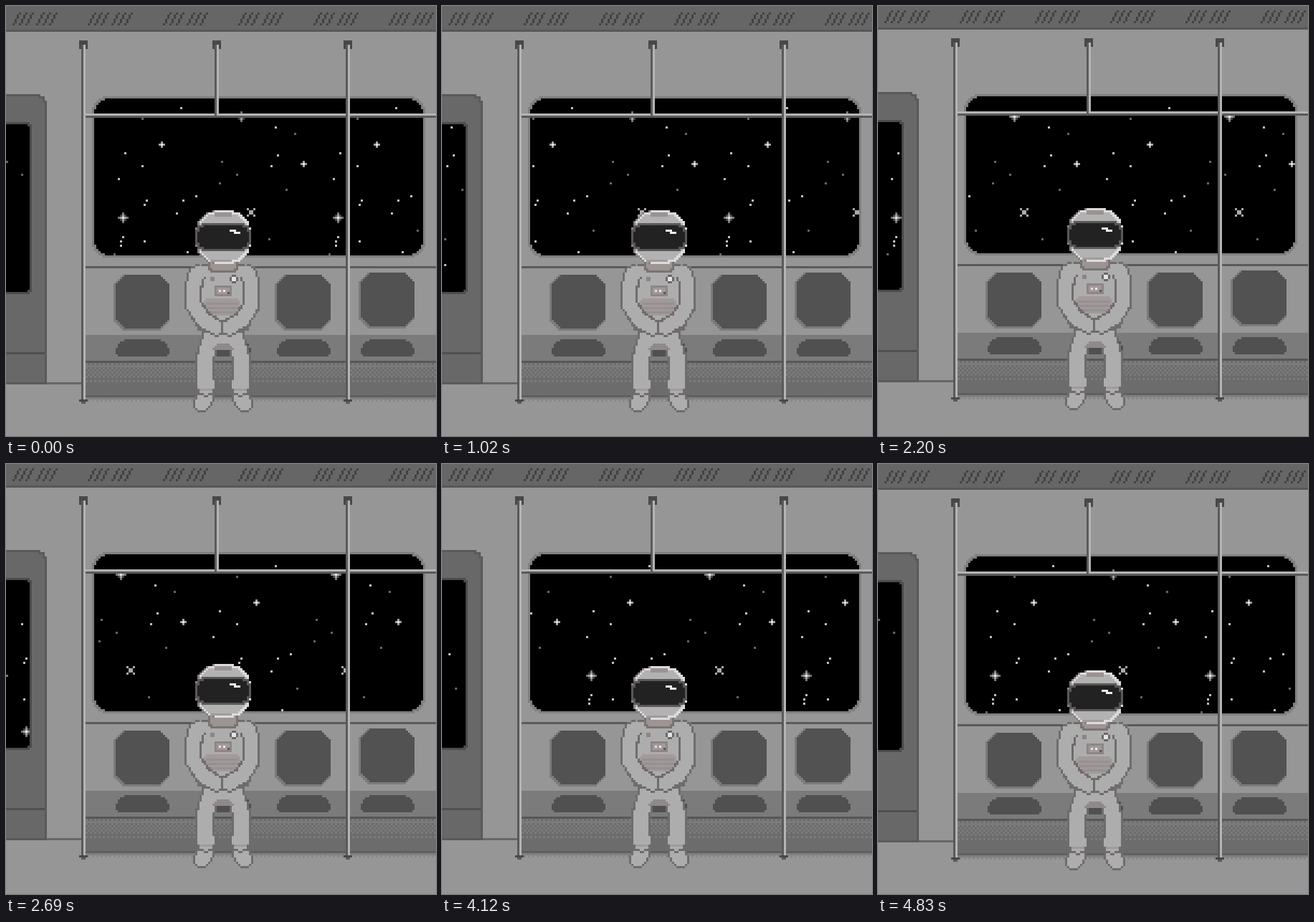
An HTML page with a canvas that plays this animation: 600x600 px, repeating every 4.86 s.

```html
<!DOCTYPE html>
<html lang="en">
<head>
<meta charset="utf-8">
<title>Space train</title>
<style>
html, body { margin: 0; width: 100%; height: 100%; overflow: hidden; background: #969696; }
canvas { display: block; width: 100%; height: 100%; image-rendering: pixelated; }
</style>
</head>
<body>
<canvas id="stage" width="200" height="200"></canvas>
<script>
const LOOP = 4860, FRAMES = 140, FIELD = 100, HEAD_LAG = 70, DIP = 80;
const SUIT = '#adadad', LINE = '#706c6c', SHADE = '#a29a9a';
const LIGHT = '#b4b4b4', DARK = '#5a5a5a', CAP = '#484848';
const stage = document.getElementById('stage').getContext('2d');

// Everything is drawn on a 200 x 200 grid of whole cells.
function layer(paint) {
  const canvas = document.createElement('canvas');
  canvas.width = 200;
  canvas.height = 206;
  paint(canvas.getContext('2d'));
  return canvas;
}

function box(g, color, x, y, w, h) {
  g.fillStyle = color;
  g.fillRect(x, y, w, h);
}

function rounded(g, color, x, y, w, h, top, bottom = top) {
  const inset = (r, row) => row < r ? Math.round(r - Math.sqrt(r * r - (r - row - 0.5) ** 2)) : 0;
  for (let row = 0; row < h; row++) {
    const cut = Math.max(inset(top, row), inset(bottom, h - 1 - row));
    box(g, color, x + cut, y + row, w - 2 * cut, 1);
  }
}

function distance(x, y, [ax, ay], [bx, by]) {
  const dx = bx - ax, dy = by - ay;
  const along = ((x - ax) * dx + (y - ay) * dy) / (dx * dx + dy * dy);
  const k = Math.min(1, Math.max(0, along));
  return Math.hypot(x - ax - k * dx, y - ay - k * dy);
}

// A thick line through the joints with round ends.
function limb(g, color, joints, radius) {
  for (let y = 115; y < 195; y++)
    for (let x = 78; x < 124; x++)
      for (let i = 1; i < joints.length; i++)
        if (distance(x + 0.5, y + 0.5, joints[i - 1], joints[i]) < radius) box(g, color, x, y, 1, 1);
}

// Joints are given as distance from the middle line.
const place = (side, middle, joints) => joints.map(([d, y]) => [middle + side * d, y]);

function pole(g, x, end) {
  box(g, CAP, x - 1, 16, 4, 4);
  box(g, DARK, x, 18, 1, end - 18);
  box(g, LIGHT, x + 1, 18, 1, end - 18);
  if (end < 100) return;
  box(g, CAP, x - 1, end, 4, 1);
  box(g, DARK, x, end + 1, 2, 1);
}

function seat(g, x, y) {
  rounded(g, '#7b7b7b', x - 1, y, 26, 26, 7);
  rounded(g, '#525252', x, y, 25, 25, 7);
  rounded(g, '#505050', x, 155, 25, 8, 6, 2);
}

const train = layer(g => {
  box(g, '#969696', 0, 0, 200, 206);
  box(g, '#666', 0, 0, 200, 11);
  box(g, '#575757', 0, 11, 200, 1);
  for (let x = 3; x < 200; x += 35)
    for (let n = 0; n < 6; n++)
      for (let r = 0; r < 6; r++)
        box(g, '#424242', x + n * 3 + (n > 2 ? 2 : 0) + 3 - Math.ceil(r / 2), 3 + r, 1, 1);

  // Door
  box(g, '#666', 0, 175, 36, 1);
  rounded(g, DARK, -10, 41, 29, 135, 5, 0);
  rounded(g, '#686868', -10, 42, 28, 133, 5, 0);
  box(g, '#505050', 0, 161, 18, 1);
  rounded(g, '#4c4c4c', -10, 54, 22, 80, 3);

  // Bench, its front darkening downwards through a dot pattern
  box(g, DARK, 36, 121, 164, 1);
  box(g, '#7b7b7b', 36, 153, 164, 28);
  box(g, '#575757', 36, 165, 164, 1);
  for (let y = 166; y < 181; y++)
    for (let x = 36; x < 200; x++) {
      const rank = (x + y) % 2 * 2 + x % 2;
      if (rank < (y - 165) / 3) box(g, '#6c6c6c', x, y, 1, 1);
    }
  box(g, '#5f5f5f', 36, 181, 164, 1);
  box(g, '#808080', 36, 182, 164, 1);
  for (let x = 36; x < 200; x += 2) box(g, '#888', x, 183, 1, 1);
  for (const x of [51, 89, 126]) seat(g, x, 125);
  seat(g, 165, 124);

  // Panes are cut out so that the sky shows through.
  rounded(g, '#7f7f7f', 40, 42, 155, 75, 8);
  g.globalCompositeOperation = 'destination-out';
  rounded(g, '#000', 41, 43, 153, 73, 8);
  rounded(g, '#000', -10, 55, 21, 78, 3);
  g.globalCompositeOperation = 'source-over';

  box(g, LIGHT, 36, 50, 164, 1);
  box(g, DARK, 36, 51, 164, 1);
  pole(g, 35, 183);
  pole(g, 97, 51);
  pole(g, 158, 183);
});

const body = layer(g => {
  const leg = [[6, 156], [8.5, 164], [8, 177]];
  const foot = [[8, 182], [10, 185]];
  const arm = [[12, 124.5], [13.5, 130], [13.5, 139], [9, 146], [3, 149.5]];
  const sides = [-1, 1];

  for (const side of sides) limb(g, LINE, place(side, 101, foot), 4.2);
  for (const side of sides) limb(g, SUIT, place(side, 101, foot), 3.2);
  for (const side of sides) limb(g, LINE, place(side, 101, leg), 4.6);
  rounded(g, LINE, 91, 150, 20, 10, 0, 3);
  for (const side of sides) limb(g, SUIT, place(side, 101, leg), 3.6);
  rounded(g, SUIT, 92, 150, 18, 9, 0, 3);
  rounded(g, '#8f8989', 96, 157, 10, 3, 4, 0);
  for (const side of sides) box(g, SHADE, 101 + side * 8 - 3, 178, 6, 1);

  // Torso
  rounded(g, LINE, 88, 120, 26, 32, 5);
  rounded(g, SUIT, 89, 121, 24, 30, 5);
  rounded(g, SHADE, 92, 136, 17, 8, 2, 4);
  for (let y = 138; y < 144; y += 2) box(g, '#979090', 93, y, 15, 1);

  for (const side of sides) {
    const joints = place(side, 100.8, arm);
    limb(g, LINE, joints, 4.2);
    limb(g, SUIT, joints, 3.2);
  }
  box(g, SUIT, 88, 121, 26, 5);

  // Chest panel and badges
  box(g, '#8e8585', 97, 130, 8, 5);
  box(g, SHADE, 98, 131, 6, 3);
  box(g, '#e4e0e0', 99, 132, 1, 1);
  box(g, '#eee', 101, 132, 1, 1);
  box(g, '#5f5858', 103, 133, 1, 1);
  box(g, '#8d8484', 95, 126, 2, 2);
  rounded(g, '#6d6868', 104, 125, 4, 4, 2);
  box(g, '#e2e2e2', 105, 126, 2, 2);

  // Collar
  rounded(g, '#7b7373', 94, 118, 14, 6, 0, 3);
  rounded(g, '#9d9494', 95, 118, 12, 5, 0, 3);
});

const head = layer(g => {
  rounded(g, '#8a8282', 88, 95, 26, 25, 11);
  rounded(g, '#dcdcdc', 89, 95, 25, 25, 11);
  rounded(g, '#b2b2b2', 89, 96, 24, 23, 11);
  box(g, '#9b9292', 97, 96, 8, 2);
  box(g, '#a39b9b', 95, 118, 10, 1);
  rounded(g, '#5c5757', 88, 101, 26, 13, 5);
  rounded(g, '#222', 89, 102, 24, 11, 5);
  box(g, '#eee', 104, 104, 3, 1);
  box(g, '#eee', 106, 105, 3, 1);
});

function random(seed) {
  return () => (seed = seed * 16807 % 2147483647) / 2147483647;
}

function cross(g, x, y, reach) {
  if (reach > 1) {
    box(g, '#444', x - 1, y - 1, 3, 3);
    box(g, '#777', x - 2, y, 5, 1);
    box(g, '#777', x, y - 2, 1, 5);
  }
  box(g, '#a0a0a0', x - 1, y, 3, 1);
  box(g, '#a0a0a0', x, y - 1, 1, 3);
  box(g, '#e4e4e4', x, y, 1, 1);
}

function starField(g, shift) {
  const next = random(71);
  for (let i = 0; i < 30; i++) {
    const x = Math.floor(next() * FIELD), y = 42 + Math.floor(next() * 89);
    box(g, i % 3 ? '#c0c0c0' : '#666', x + shift, y, 1, 1);
  }
  for (const [x, y] of [[72, 64], [38, 73], [19, 126]]) cross(g, x + shift, y, 1);
  for (const [x, y] of [[54, 98], [9, 51], [65, 124]]) cross(g, x + shift, y, 2);
  for (let i = 0; i < 4; i++) {
    box(g, '#aaa', 12 + i + shift, 94 + i, 1, 1);
    box(g, '#aaa', 15 - i + shift, 94 + i, 1, 1);
  }
}

const sky = layer(g => {
  for (const shift of [0, FIELD]) starField(g, shift);
});

// Start and length of each bump in the ride
const BUMPS = [[0, 1100], [1740, 1400], [3860, 940]];

function bounce(t) {
  const bump = BUMPS.find(([start, length]) => t >= start && t < start + length);
  return bump ? -Math.round(2 * Math.sin(Math.PI * (t - bump[0]) / bump[1]) ** 2) : 0;
}

const landing = t => BUMPS.some(([start, length]) => t >= start + length && t < start + length + DIP);

function draw(now) {
  const t = now % LOOP;
  const frame = Math.floor(t * FRAMES / LOOP);
  const scroll = Math.ceil(frame * FIELD / (FRAMES - 1)) % FIELD;
  const lift = bounce(t);
  const nod = bounce(t - HEAD_LAG) + (landing(t) ? 1 : 0);
  box(stage, '#000', 0, 0, 200, 200);
  stage.drawImage(sky, -scroll, 0);
  stage.drawImage(sky, 2 * FIELD - scroll, 0);
  stage.drawImage(train, 0, lift);
  stage.drawImage(body, 0, lift);
  stage.drawImage(head, 0, nod);
}

const start = performance.now();
function tick() {
  draw(performance.now() - start);
  requestAnimationFrame(tick);
}
tick();
</script>
</body>
</html>
```
